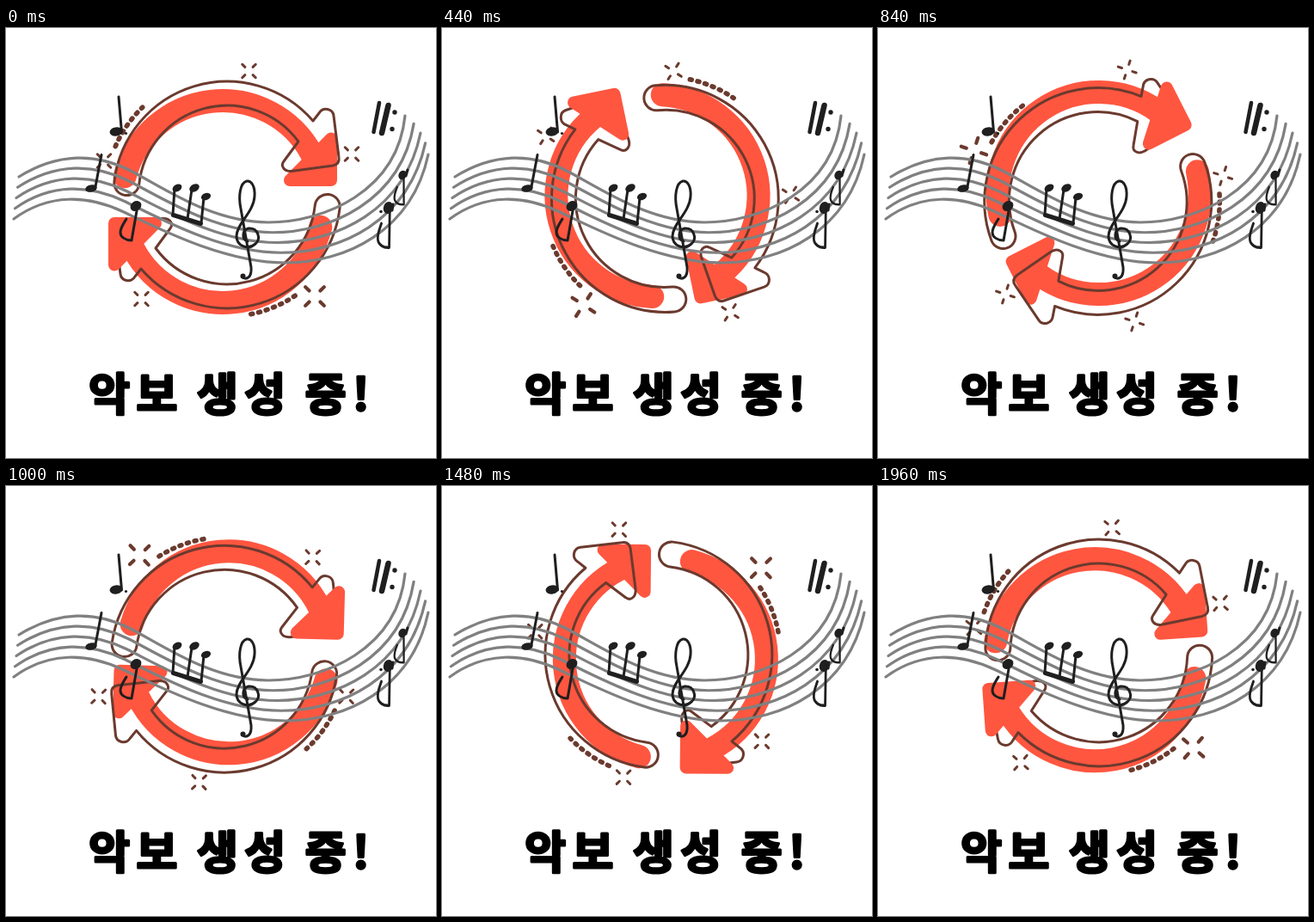
These frames come from a looping animation (500 px wide and 500 px high, 2000 ms). An HTML page:

```html
<!DOCTYPE html>
<html lang="ko">
<head>
<meta charset="utf-8">
<title>악보 생성 중!</title>
<style>
  html, body { margin: 0; width: 100%; height: 100%; overflow: hidden; background: #fff; }
  svg { display: block; width: 100vw; height: 100vh; }
  .line { fill: none; stroke: #6b3a2e; stroke-width: 3; stroke-linecap: round; stroke-linejoin: round; }
  .red { fill: none; stroke: #ff5640; stroke-width: 27; stroke-linecap: round; }
  .head { fill: #ff5640; stroke: #ff5640; stroke-width: 14; stroke-linejoin: round; }
  .dots { stroke-width: 5.6; stroke-dasharray: 2 7; }
  #staff { fill: none; stroke: #808080; stroke-width: 3.2; stroke-linecap: round; }
  .ink { fill: none; stroke: #1f1f1f; stroke-width: 3; stroke-linecap: round; stroke-linejoin: round; }
  .solid { fill: #1f1f1f; stroke: none; }
  text {
    font: 900 52px "Noto Sans CJK KR", "Noto Sans CJK", "Noto Sans KR", sans-serif;
    letter-spacing: 7.5px; word-spacing: -7px;
    stroke: #000; stroke-width: 3px; stroke-linejoin: round;
  }
</style>
</head>
<body>
<svg viewBox="0 0 500 500">
  <defs>
    <path id="shaft" class="red" d="M138.2 172.6A117.5 117.5 0 0 1 355.7 146.8"/>
    <path id="head" class="head" d="M330 177H378V128.5Z"/>
    <path id="outline" class="line" d="M357 108L364 99C369 91 380 94 381 102L387 150C388 156 385 159 380 160L332 166.5C323 167 319 160 323 155L340 132A103 103 0 0 0 154.7 181.8A14.5 14.5 0 0 1 125.9 178.4A132 132 0 0 1 357 108Z"/>
    <path id="spark" d="M6.5 0H11M-6.5 0H-11M0 6.5V11M0 -6.5V-11"/>
    <!-- hanging eighth note, origin at the head -->
    <g id="eighth">
      <ellipse class="solid" rx="6.8" ry="5.6" transform="rotate(-35)"/>
      <path d="M2 0L-5 40C-12 40 -18 36 -18 31C-18 25 -14 20 -11 15"/>
    </g>
  </defs>

  <g id="wheel">
    <use href="#shaft"/>
    <use href="#head"/>
    <use href="#shaft" transform="rotate(180 252 202)"/>
    <use href="#outline"/>
    <use href="#outline" transform="rotate(180 257 194)"/>
    <!-- this head lies over its outline -->
    <use href="#head" transform="rotate(180 252 202)"/>
    <g id="trim" class="line"></g>
  </g>

  <g id="staff"></g>

  <g class="ink">
    <!-- dotted quarter and plain quarter -->
    <path d="M131 80L134.5 121M111 147.5L103.5 187"/>
    <ellipse class="solid" cx="128" cy="120.5" rx="7.5" ry="5.2" transform="rotate(-10 128 120.5)"/>
    <circle class="solid" cx="139.5" cy="122.5" r="1.6"/>
    <ellipse class="solid" cx="99" cy="186.5" rx="6.8" ry="4.2" transform="rotate(-12 99 186.5)"/>

    <use href="#eighth" x="151" y="207"/>
    <use href="#eighth" transform="translate(444.5 209) rotate(-7) scale(.92 1.15)"/>
    <circle class="solid" cx="436" cy="213.5" r="1.8"/>
    <use href="#eighth" transform="translate(461 171) rotate(-9) scale(.75 .85)"/>
    <path d="M450 205L449 212M467 165L465 172"/>

    <!-- beamed group -->
    <path d="M196 187L194 217M216 188L211 222M230 197L227 227"/>
    <path d="M194.5 217.5L226.5 227.5" stroke-width="5"/>
    <ellipse class="solid" cx="199" cy="186" rx="5.8" ry="4" transform="rotate(-30 199 186)"/>
    <ellipse class="solid" cx="219" cy="186" rx="6.2" ry="4.2" transform="rotate(-30 219 186)"/>
    <ellipse class="solid" cx="232.5" cy="196" rx="5.8" ry="4" transform="rotate(-20 232.5 196)"/>

    <!-- treble clef -->
    <path d="M281 248C274 246 274 235 282 233C293 232 297 245 290 251C281 259 268 253 268 242C268 228 288 214 289 196C290 184 285 177 280 178C272 180 270 196 273 210L285 278C286 290 280 293 275 290"/>
    <circle class="solid" cx="275.5" cy="288.5" r="3"/>

    <!-- repeat sign -->
    <path d="M434 87L427.5 121" stroke-width="4.5"/>
    <path d="M444.5 90L437 122" stroke-width="6.5"/>
    <circle class="solid" cx="452" cy="98" r="2.7"/>
    <circle class="solid" cx="449" cy="117.5" r="2.7"/>
  </g>

  <text x="263" y="444.5" text-anchor="middle">악보 생성 중!</text>
</svg>
<script>
  const $ = id => document.getElementById(id);

  // Sparkles and dotted arcs that turn with the wheel
  const spark = (x, y, size = 1) =>
    `<use href="#spark" transform="translate(${x} ${y}) rotate(45) scale(${size})"/>`;
  const onRing = deg => {
    const a = deg * Math.PI / 180;
    return `${257 + 141.5 * Math.cos(a)} ${194 + 141.5 * Math.sin(a)}`;
  };
  const dots = (from, to) =>
    `<path class="dots" d="M${onRing(from)}A141.5 141.5 0 0 1 ${onRing(to)}"/>`;
  $('trim').innerHTML =
    spark(282.5, 50) + spark(402, 146.5) + spark(157.5, 315) + spark(114, 154.5) +
    spark(359, 312, 1.4) + dots(56, 78.7) + dots(203.5, 226);

  // Five staff lines blended between the top and the bottom curve
  const top5 = [15, 173, 60, 145, 105, 145, 145, 166, 240, 226, 305, 226, 455, 190, 464, 102];
  const low5 = [9, 222, 50, 192, 95, 194, 137, 214, 255, 273, 325, 273, 472, 236, 491, 147];
  for (let i = 0; i < 5; i++) {
    const t = i / 4, bow = 4 * t * (1 - t);
    const p = top5.map((v, j) => v + (low5[j] - v) * t);
    p[14] += 4.5 * bow;
    p[15] -= 2.5 * bow;
    $('staff').innerHTML +=
      `<path d="M${p.slice(0, 2)}C${p.slice(2, 8)}S${p.slice(8, 12)}S${p.slice(12)}"/>`;
  }

  // Two small turns per tick, with one extra every third of the loop
  const TICK = 40, TICKS = 50, TURN = 3.56;
  const start = performance.now();
  function draw() {
    const k = Math.floor((performance.now() - start) / TICK) % TICKS;
    const angle = (2 * k + Math.floor(3 * k / TICKS)) * TURN;
    $('wheel').setAttribute('transform', `rotate(${angle} 255.5 197.6)`);
    requestAnimationFrame(draw);
  }
  draw();
</script>
</body>
</html>
```
